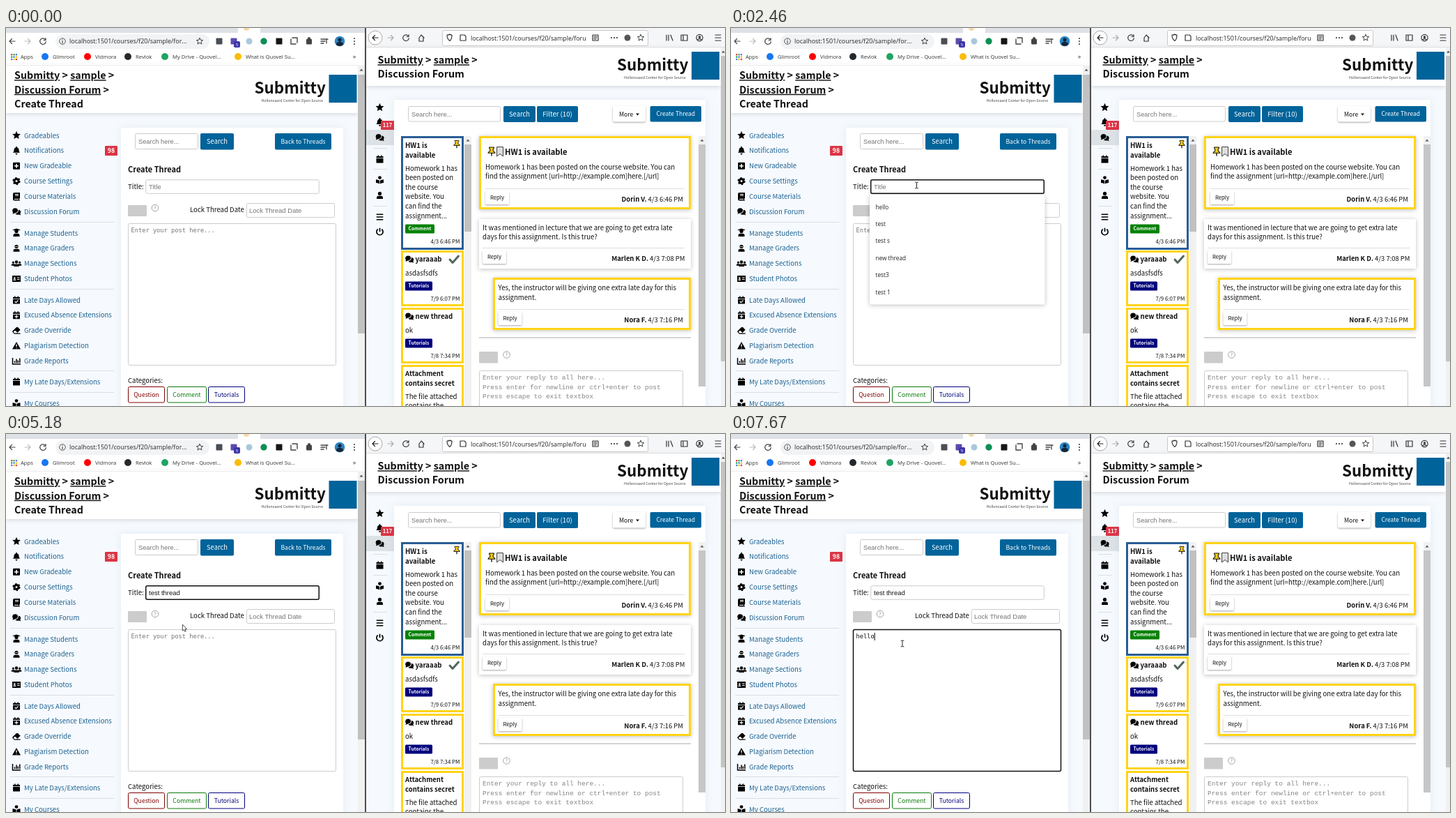
These frames come from a looping animation (1032 by 542 pixels, 8 s). An HTML page:

```html
<!DOCTYPE html>
<html lang="en">
<head>
<meta charset="utf-8">
<title>Create Thread</title>
<style>
html, body { margin: 0; width: 100%; height: 100%; overflow: hidden; background: #fff; }
svg { display: block; width: 1032px; height: 542px; }
text { font-family: "Noto Sans CJK SC", "Noto Sans CJK JP", "Noto Sans CJK KR", sans-serif; white-space: pre; }
.ui { font-family: "Open Sans", "Noto Sans", sans-serif; }
.option { font-family: "Open Sans", "Noto Sans", sans-serif; font-weight: 500; }
.field { font-family: "Liberation Sans", sans-serif; }
.mono { font-family: "DejaVu Sans Mono", monospace; }
.courier { font-family: "Liberation Mono", monospace; }
.b { font-weight: 700; }
.u { text-decoration: underline; }
.card { filter: drop-shadow(0 1px 3px rgba(0, 0, 0, .25)); }
.panel { filter: drop-shadow(0 0 6px rgba(60, 100, 140, .1)); }
.btn { filter: drop-shadow(0 1px 1px rgba(0, 0, 0, .35)); }
</style>
</head>
<body>
<svg id="stage" viewBox="0 0 1032 542" xmlns="http://www.w3.org/2000/svg"></svg>
<script>
const LOOP = 8000;
const INK = '#111', LINK = '#1d6190', BLUE = '#00639a', GOLD = '#ffd414', RED = '#dc3545', GREY = '#757575';
const PAGE = '#f6fafe';

// Drawing helpers; y of a text is the middle of its capitals.
const rect = (x, y, w, h, fill, more = '') =>
  `<rect x="${x}" y="${y}" width="${w}" height="${h}" fill="${fill}" ${more}/>`;
const box = (x, y, w, h, stroke, lw = 1, r = 2, fill = '#fff', more = '') =>
  rect(x + lw / 2, y + lw / 2, w - lw, h - lw, fill, `rx="${r}" stroke="${stroke}" stroke-width="${lw}" ${more}`);
const dot = (x, y, r, fill, more = '') => `<circle cx="${x}" cy="${y}" r="${r}" fill="${fill}" ${more}/>`;
const text = (s, x, y, size = 9.6, fill = INK, cls = '', anchor = 'start') =>
  `<text x="${x}" y="${y + size * .365}" font-size="${size}" fill="${fill}" class="${cls}" text-anchor="${anchor}">${s}</text>`;
const mid = (s, x, y, size, fill, cls) => text(s, x, y, size, fill, cls, 'middle');
const lines = (list, x, y, step, ...style) => list.map((s, i) => text(s, x, y + i * step, ...style)).join('');
const stroke = (d, color = '#444', lw = 1.2) =>
  `<path d="${d}" fill="none" stroke="${color}" stroke-width="${lw}" stroke-linecap="round" stroke-linejoin="round"/>`;
const fillPath = (d, color) => `<path d="${d}" fill="${color}"/>`;
const button = (s, x, y, w, h, size) =>
  rect(x, y, w, h, BLUE, 'rx="2"') + mid(s, x + w / 2, y + h / 2, size, '#fff');
const rule = (x1, x2, y, color = '#d9dfe4') => rect(x1, y, x2 - x1, 1, color);

const starPath = (r, inner) => 'M' + Array.from({ length: 10 }, (_, i) => {
  const a = Math.PI * i / 5, k = i % 2 ? inner : r;
  return `${(k * Math.sin(a)).toFixed(2)} ${(-k * Math.cos(a)).toFixed(2)}`;
}).join('L') + 'Z';

// Icons centred on 0,0 in a box of about 12 px.
const bubble = 'M-2-5C1-5 2-3.5 2-1.5S0 2-2 2L-5.5 3.5-5 1C-7-2-5-5-2-5Z';
const person = (x = 0, s = 1) =>
  `<g transform="translate(${x} 0) scale(${s})"><circle cy="-2.6" r="2.6"/><path d="M-4.5 5V3.5Q-4.5.8-1.8.8H1.8Q4.5.8 4.5 3.5V5Z"/></g>`;
const calendar = mark =>
  `<path d="M-5-4H-3V-5.5H-1.5V-4H1.5V-5.5H3V-4H5V-2H-5ZM-5-1.2H5V5.5H-5Z"/>${mark ? `<path d="${mark}" stroke="#fff" stroke-width="1.2" fill="none"/>` : ''}`;
const icons = {
  star: `<path d="${starPath(6.2, 2.9)}"/>`,
  bell: '<path d="M-5 3Q-3.5 1.5-3.5-1-3.5-4-.7-4.5V-6H.7V-4.5Q3.5-4 3.5-1 3.5 1.5 5 3ZM-1.6 4H1.6Q1 6 0 6T-1.6 4Z"/>',
  plus: '<rect x="-5" y="-5" width="10" height="10" rx="1"/><path d="M-3 0H3M0-3V3" stroke="#fff" stroke-width="1.6"/>',
  gear: '<circle r="3" fill="none" stroke="#000" stroke-width="3"/><circle r="4.7" fill="none" stroke="#000" stroke-width="1.8" stroke-dasharray="2.46"/>',
  book: '<path d="M-3-5.5H5V3H4V5H5V6H-3Q-5 6-5 4V-3.5Q-5-5.5-3-5.5Z"/><path d="M-2-3H3M-2-1.2H3M-3 4H3" stroke="#fff"/>',
  chat: `<path d="${bubble}"/><path d="M2.8-2.4C7-2 6.5 2 5.3 3L6.2 5.2 3.4 4.2C1.5 4.8-.8 4.2-1.6 2.9 1.5 2.8 3.2.5 2.8-2.4Z"/>`,
  grad: person() + '<path d="M-6-4.6L0-6.5 6-4.6 0-3Z"/>',
  grader: person() + '<path d="M-2-2.4H2" stroke="#fff" stroke-width=".7"/>',
  users: person(0, .85) + person(-4.6, .6) + person(4.6, .6),
  card: '<path d="M-6-4.5H6V4.5H-6Z"/><path d="M-4.5 2.5V1H-1V2.5ZM-4-2H-1.5V.2H-4ZM1-2H4.6V-1H1ZM1 .5H4.6V1.5H1Z" fill="#fff"/>',
  calCheck: calendar('M-2.4 2L-.6 3.6 2.6.4'),
  calPlus: calendar('M-2.5 2H2.5M0-.5V4.5'),
  cal: calendar(),
  eraser: '<path d="M-5.8 1L0-4.6H2L5.6-1 1 3.8H5.6V5H-3L-5.8 2Z"/><path d="M-2 0L1.6 3.2-.5 3.9H-2.6L-4.4 2Z" fill="#fff"/>',
  warn: '<path d="M0-5.5L6 5H-6Z"/><path d="M0-2V1.4M0 2.6V3.8" stroke="#fff" stroke-width="1.3"/>',
  chart: '<path d="M-5.5-4.5V4.5H6M-2.5 2.8V0M0 2.8V-3M2.3 2.8V-1M4.8 2.8V-4" fill="none" stroke="#000" stroke-width="1.5"/>',
  reader: '<circle cy="-3.4" r="2.4"/><path d="M-5.5-.8Q-2-.8-.4.8V5.5Q-2 4-5.5 4ZM5.5-.8Q2-.8.4.8V5.5Q2 4 5.5 4Z"/>',
  user: person(),
  bars: '<path d="M-4.8-3.8H4.8M-4.8 0H4.8M-4.8 3.8H4.8" stroke="#000" stroke-width="1.6"/>',
  power: '<path d="M-2.8-3.5A4.6 4.6 0 1 0 2.8-3.5M0-5.2V0" fill="none" stroke="#000" stroke-width="1.7"/>',
  pin: '<path d="M-3-5.5H3V-4L2-3V-.5Q4.5.5 4.5 2H-4.5Q-4.5.5-2-.5V-3L-3-4Z" fill="#ffcf10" stroke="#111"/><path d="M0 2V6" stroke="#111" stroke-width="1.3"/>'
};
const icon = (name, x, y, s = 1) => `<g transform="translate(${x} ${y}) scale(${s})">${icons[name]}</g>`;

const help = (x, y) => dot(x, y, 4.8, 'none', 'stroke="#999" stroke-width=".9"') + mid('?', x, y, 7, '#888');
const reload = (x, y) => stroke(`M${x + 3} ${y - 3}A4.3 4.3 0 1 0 ${x + 4.3} ${y + .6}M${x + 4} ${y - 4.5}V${y - 1.5}H${x + 1}`);
const arrow = (x, y, dir, color) => stroke(`M${x - 4} ${y}H${x + 4}M${x + dir * 4} ${y}l${-dir * 3.5}-3.5m0 7l${dir * 3.5}-3.5`, color);
const outlineStar = (x, y) =>
  `<path d="${starPath(5, 2.2)}" transform="translate(${x} ${y})" fill="none" stroke="#444"/>`;
const upArrow = (x, y) => fillPath(`M${x - 2.5} ${y + 1.5}L${x} ${y - 1.5}L${x + 2.5} ${y + 1.5}Z`, '#555');
const brand = (x, y) =>
  rect(x + 147, y + 5, 40, 40, BLUE) +
  text('Submitty', x + 40, y + 24, 22.4, INK, 'b') +
  text('Hollenvaard Center for Open Source', x + 50, y + 42, 5.3, '#444');
const header = (x, w, y, h) => rect(x, y, w, h, '#fff', 'style="filter:drop-shadow(0 1px 3px rgba(0,0,0,.16))"');
const crumb = s => `<tspan class="u">${s}</tspan> &gt;`;

function leftBrowser() {
  const bookmarks = [['Glimroot', 67, '#1877f2'], ['Vidmora', 128, '#f00'], ['Revlok', 186, '#24292e'],
    ['My Drive - Quovel...', 239, '#1fa463'], ['What is Quovel Su...', 344, '#fbbc04']];
  const extensions = [[306, '#4a4e55'], [327, '#5b4bb0'], [392, '#161616']];
  return rect(0, 0, 516, 542, PAGE) + rect(0, 0, 516, 53, '#fff') + rect(0, 0, 516, 7, '#dee1e6') +
    rect(333, 0, 32, 8, '#fff') + dot(345, 0, 4, '#f6d9a8') +
    arrow(9, 19, -1) + arrow(31, 19, 1, '#bbb') + reload(53, 19) +
    rect(71, 9, 221, 21, '#f1f3f4', 'rx="10.5"') +
    dot(81, 19, 4.3, 'none', 'stroke="#555"') + stroke('M81 18.8V21.3M81 16.8V17') +
    text('localhost:1501/courses/f20/sample/for...', 91, 19, 8.95, '#26282b', 'ui') + outlineStar(278, 19) +
    extensions.map(([x, c]) => rect(x - 4.5, 14.5, 9, 9, c, 'rx="1"')).join('') +
    rect(327, 19, 9, 9, '#3a36a8', 'rx="2"') + mid('5', 331.5, 23.5, 6, '#fff', 'ui') +
    dot(349, 19, 4.5, '#a9c8dc') + dot(370, 19, 4.7, '#0b8f55') +
    stroke('M409 16V23H416M411 14H418V21', '#444', 1.4) + rect(431, 15.5, 8, 8, '#444', 'rx="1.5"') + dot(435, 15, 2, '#444') +
    stroke('M452 16H460M452 19H458M452 22H456M460 22V16H462', '#444', 1.3) +
    dot(479, 19, 7.3, '#2a86c5') + dot(479, 16.8, 2.6, '#152638') + fillPath('M474 24Q474 19.8 479 19.8T484 24Q479 28 474 24Z', '#152638') +
    [15, 19, 23].map(y => dot(500, y, 1.1, '#444')).join('') +
    [0, 3.4, 6.8].map((a, i) => [0, 3.4, 6.8].map((b, j) =>
      rect(7 + a, 37 + b, 2.3, 2.3, ['#ea4335', '#34a853', '#4285f4', '#fbbc04'][(i + j) % 4])).join('')).join('') +
    text('Apps', 21, 41, 7.7, '#333', 'ui') +
    bookmarks.map(([s, x, c]) => dot(x - 11, 41, 5, c) + text(s, x, 41, 7.7, '#333', 'ui')).join('') +
    mid('»', 500, 40.5, 9, '#333', 'ui') + rect(0, 53, 505, 1, '#e2e4e6') +
    header(0, 505, 54, 68) + rect(0, 52, 505, 1.5, '#fff') +
    text(crumb('Submitty') + ' ' + crumb('sample'), 12, 68, 14.3, INK, 'b') +
    text(crumb('Discussion Forum'), 12, 88.5, 14.3, INK, 'b') + text('Create Thread', 12, 109, 14.3, INK, 'b') +
    brand(316.5, 62) + leftMenu() + leftForm() +
    rect(505, 54, 10, 488, '#f1f1f1') + rect(505, 67, 10, 371, '#c1c1c1') + upArrow(510, 60);
}

function leftMenu() {
  const groups = [
    [154, ['star', 'Gradeables'], ['bell', 'Notifications'], ['plus', 'New Gradeable'], ['gear', 'Course Settings'],
      ['book', 'Course Materials'], ['chat', 'Discussion Forum']],
    [294, ['grad', 'Manage Students'], ['grader', 'Manage Graders'], ['users', 'Manage Sections'], ['card', 'Student Photos']],
    [390, ['calCheck', 'Late Days Allowed'], ['calPlus', 'Excused Absence Extensions'], ['eraser', 'Grade Override'],
      ['warn', 'Plagiarism Detection'], ['chart', 'Grade Reports']],
    [507, ['cal', 'My Late Days/Extensions']],
    [538, ['reader', 'My Courses']]
  ];
  return groups.map(([y, ...items]) =>
    items.map(([name, s], i) => icon(name, 15, y + i * 21.85) + text(s, 26, y + i * 21.85, 9.6, LINK)).join('')).join('') +
    [278, 374, 491, 522].map(y => rule(6, 155, y)).join('') +
    rect(142, 169, 18, 14, RED, 'rx="1"') + mid('98', 151, 176, 8.7, '#fff', 'b');
}

function leftForm() {
  const category = (s, x, w, c) => box(x, 514, w, 23.5, c) + mid(s, x + w / 2, 525.5, 8.7, c);
  return rect(165, 143, 319, 410, '#fff', 'class="panel"') +
    box(185, 151, 91, 23, '#ccc') + text('Search here...', 190, 162.5, 9.3, GREY, 'field') +
    button('Search', 279, 151, 48, 23.5, 9.4) + button('Back to Threads', 386, 151, 81, 23.5, 8.6) +
    text('Create Thread', 175, 203, 11, INK, 'b') + text('Title:', 175, 227) +
    rect(175, 254, 27, 16, '#ccc', 'rx="1"') + help(214, 258) +
    text('Lock Thread Date', 264, 260.5) + box(345, 251, 127, 21, '#ccc') +
    text('Lock Thread Date', 349, 261.5, 9.5, GREY, 'field') +
    text('Categories:', 175, 505) +
    category('Question', 175, 53, '#800000') + category('Comment', 231, 57, '#0a7a0a') + category('Tutorials', 290, 53, '#00007c');
}

function rightBrowser() {
  const lineIcons = 'M593 14L596 10 600 14M593 14V19H599V14M652 10H658L660 12V18H652ZM842 10H850V18H842ZM844 12H848M844 14H848M844 16H847' +
    'M633 10Q636 10 637 9 638 10 640 10 640 16 637 18.5 633 16 633 10M948 10V18M951 10V18M954 10L957 18M969 10H978V18H969ZM972 10V18M1018 10H1026M1018 14H1026M1018 18H1026';
  return rect(516, 0, 516, 542, PAGE) + rect(516, 0, 516, 28, '#f5f6f7') +
    box(626, 3, 296, 23, '#c8c8cc') + dot(530, 14, 10, '#fff', 'stroke="#aaa"') + arrow(530, 14, -1, '#222') +
    arrow(552, 14, 1, '#aaa') + reload(574, 14) + stroke(lineIcons, '#333') +
    '<clipPath id="url"><rect x="660" y="3" width="173" height="22"/></clipPath><g clip-path="url(#url)">' +
    text('localhost:1501/courses/f20/sample/forum', 667, 14.5, 8.9, '#222', 'ui') + '</g>' +
    [869, 873, 877].map(x => dot(x, 14, 1.1, '#333')).join('') + dot(892, 14, 4.5, '#555') + outlineStar(911, 14) +
    dot(995.5, 14, 4.6, 'none', 'stroke="#333" stroke-width="1.2"') + dot(995.5, 13, 1.8, '#333') + stroke('M992.5 17Q995.5 14 998.5 17', '#333') +
    rect(516, 27, 516, 1, '#ccc') + header(517, 509, 28, 55) + rect(516, 26, 516, 1.5, '#f5f6f7') +
    text(crumb('Submitty') + ' ' + crumb('sample'), 533.5, 46, 14.3, INK, 'b') + text('Discussion Forum', 533.5, 66, 14.3, INK, 'b') +
    brand(837, 29) + rightMenu() +
    rect(557, 103, 447, 450, '#fff', 'class="panel"') + rightTools() + threads() + posts() +
    rect(994, 155, 10, 359, '#f1f1f1') + rect(994, 167, 10, 347, '#c6c6c6') + upArrow(999, 161) +
    rect(1026, 28, 6, 514, '#f1f1f1') + rect(1026, 40, 6, 438, '#c4c4c4') + upArrow(1029.5, 34) +
    rect(515, 0, 2, 542, '#4b4d50');
}

function rightMenu() {
  const items = [['star', 114], ['bell', 135], ['chat', 157], ['cal', 188], ['reader', 218], ['user', 240], ['bars', 271], ['power', 292]];
  return rect(517, 146, 40, 22, '#dde2e6') + items.map(([name, y]) => icon(name, 536.5, y)).join('') +
    [172, 202, 255].map(y => rule(527, 547, y)).join('') +
    rect(538, 133, 19, 13, RED, 'rx="1"') + mid('117', 547.5, 139.5, 7.6, '#fff', 'b');
}

function rightTools() {
  return box(577, 112, 133, 22.5, '#ccc') + text('Search here...', 582, 123.5, 9.3, GREY, 'field') +
    button('Search', 714, 112, 46, 23, 9.4) + button('Filter (10)', 762, 112, 59, 23, 9.6) +
    rect(871, 112, 47, 22.5, '#fff', 'rx="2" class="btn"') + text('More', 880, 123.5, 8.7) + fillPath('M904 122.5H909L906.5 125.5Z', INK) +
    button('Create Thread', 924.5, 112, 73.5, 22.5, 8.5);
}

function threads() {
  const x = 573;
  const tag = (s, y, w, c) => rect(x, y - 6.5, w, 13, c, 'rx="1.5"') + mid(s, x + w / 2, y, 6.8, '#fff', 'b');
  const stamp = (s, y) => text(s, 651.5, y, 7.9, INK, '', 'end');
  const small = (title, body, date, y) => box(567, y, 90, 80, GOLD, 3, 0) + icon('chat', 579, y + 12.5) +
    text(title, 587.5, y + 12.5, 9.6, INK, 'b') + text(body, x, y + 32) + tag('Tutorials', y + 51, 39, '#00007c') + stamp(date, y + 69);
  return box(567, 155, 90, 163, '#2a5d95', 3, 0) + lines(['HW1 is', 'available'], x, 168.5, 13.5, 9.7, INK, 'b') +
    icon('pin', 647, 166.5, .95) +
    lines(['Homework 1 has', 'been posted on', 'the course', 'website. You', 'can find the', 'assignment...'], x, 201, 13.6) +
    tag('Comment', 288, 42, '#078207') + stamp('4/3 6:46 PM', 306) +
    small('yaraaab', 'asdasfsdfs', '7/9 6:07 PM', 319) + stroke('M637 332L641 336.5 649.5 327', '#52685a', 3) +
    small('new thread', 'ok', '7/8 7:34 PM', 401) +
    box(567, 483, 90, 70, GOLD, 3, 0) + lines(['Attachment', 'contains secret'], x, 496, 13.5, 9.5, INK, 'b') +
    lines(['The file attached', 'contains the'], x, 528, 13.5) +
    rect(658, 155, 10, 387, '#f1f1f1') + rect(658, 167, 10, 125, '#c1c1c1') + upArrow(663, 161);
}

function posts() {
  const post = ({ x, y, h, textY, pad, right = 972, framed, body, who, when }) => {
    const end = y + h;
    return `<g class="card">${framed ? box(x, y, 983 - x, h, GOLD, 3, 0) : rect(x, y, 983 - x, h, '#fff')}</g>` +
      rule(pad, 974, end - 30, '#ddd') +
      rect(pad, end - 26, 34, 19, '#fff', 'rx="1.5" class="btn"') + mid('Reply', pad + 17, end - 16.5, 7.7, INK) +
      text(`<tspan class="b">${who}</tspan> ${when}`, right, end - 14.5, 9.45, INK, '', 'end') +
      lines(body, pad, textY, 13.7, 9.65);
  };
  return post({ x: 679, y: 155, h: 105, textY: 199, pad: 688, framed: true, who: 'Dorin V.', when: '4/3 6:46 PM',
      body: ['Homework 1 has been posted on the course website. You can', 'find the assignment [url=http://example.com]here.[/url]'] }) +
    icon('pin', 697, 177, 1.1) + '<path d="M704.5 170.5H713.5V184L709 180.5 704.5 184Z" fill="#ddd" stroke="#444"/>' +
    text('HW1 is available', 716, 177.5, 11.2, INK, 'b') +
    post({ x: 679, y: 274, h: 71, textY: 286, pad: 684, right: 974.5, who: 'Marlen K D.', when: '4/3 7:08 PM',
      body: ['It was mentioned in lecture that we are going to get extra late', 'days for this assignment. Is this true?'] }) +
    post({ x: 699, y: 358, h: 75, textY: 372.5, pad: 706.5, framed: true, who: 'Nora F.', when: '4/3 7:16 PM',
      body: ['Yes, the instructor will be giving one extra late day for this', 'assignment.'] }) +
    rule(679, 983, 443.5, '#aaa') + rect(679, 464, 27, 16.5, '#ccc', 'rx="1"') + help(718.5, 468.5) +
    box(679, 491, 293, 70, '#ccc') +
    lines(['Enter your reply to all here...', 'Press enter for newline or ctrl+enter to post', 'Press escape to exit textbox'],
      684, 501, 13.5, 9.47, '#858585', 'courier');
}

const stage = document.getElementById('stage');
stage.innerHTML = leftBrowser() + rightBrowser() + `
  <rect id="titleBox" x="200.75" y="217.75" width="248.5" height="19.5" rx="2" fill="#fff"/>
  <rect id="bodyBox" x="175.5" y="280.5" width="298" height="203" rx="2" fill="#fff"/>
  <text id="titleText" class="field" x="205" y="230.5" font-size="9.5"/>
  <text id="bodyText" class="mono" x="179.5" y="293.3" font-size="8.7"/>
  <g id="menu"></g>
  <rect id="caret" width="1" fill="#000"/>
  <g id="cursor">
    <path id="pointer" d="M0 0V9L2.1 7.2 3.5 10.2 4.9 9.6 3.6 6.6H6.3Z" fill="#fff" stroke="#222" stroke-width=".8"/>
    <path id="beam" d="M-2.3-4.3H-.6L0-3.8.6-4.3H2.3M0-3.8V3.8M-2.3 4.3H-.6L0 3.8.6 4.3H2.3" fill="none" stroke="#222"/>
  </g>
  <circle id="glow" r="8" fill="#f6ec20" opacity=".6"/>`;
const el = id => document.getElementById(id);
const show = (id, on) => el(id).setAttribute('visibility', on ? 'visible' : 'hidden');
const set = (id, attrs) => { for (const k in attrs) el(id).setAttribute(k, attrs[k]); };
const within = (t, spans) => spans.some(([a, b]) => t >= a && t < b);
const latest = (list, t) => list.filter(([at]) => t >= at).pop()?.[1];

const titleKeys = [[0, ''], [2770, 'te'], [2920, 'tes'], [3080, 'test'], [3780, 'test '], [3930, 'test t'],
  [4100, 'test th'], [4175, 'test thr'], [4250, 'test threa'], [4480, 'test thread']];
const bodyKeys = [[0, ''], [7130, 'h'], [7280, 'he'], [7430, 'hel'], [7520, 'hell'], [7670, 'hello']];
const menus = [[2010, ['hello', 'test', 'test s', 'new thread', 'test3', 'test 1']],
  [2770, ['test', 'test s', 'test3', 'test thread', 'test 1', 'test 2']],
  [2920, ['test', 'test s', 'test3', 'test 1', 'test 2', 'test branch']],
  [3780, ['test s', 'test 1', 'test 2', 'test branch', 'test thread', 'test a']],
  [3930, ['test thread']], [4480, null]];
const caretOn = [[1910, 2460], [2770, 3630], [3780, 5030], [5570, 6270], [6730, LOOP]];
const smooth = p => p * p * (3 - 2 * p), easeOut = p => 1 - (1 - p) ** 2.5, linear = p => p;
const moves = [
  { start: 130, end: 280, steps: 3, from: [778, 531], to: [493, 394], ease: linear },
  { start: 580, end: 1120, steps: 8, from: [478, 386], to: [264, 219], ease: smooth },
  { start: 1520, end: 1680, steps: 3, from: [264.5, 221], to: [266.5, 225.5], ease: linear },
  { start: 5030, end: 5570, steps: 8, from: [263, 237], to: [246, 300.5], ease: easeOut }
];

function cursorAt(t) {
  const m = moves.filter(m => t >= m.start).pop();
  if (!m) return null;
  const last = m.steps - 1;
  const k = Math.min(last, Math.floor((t - m.start + 8) / (m.end - m.start) * last));
  const p = m.ease(k / last);
  return m.from.map((v, i) => v + (m.to[i] - v) * p);
}

let shownMenu;
function drawMenu(items) {
  if (items === shownMenu) return;
  shownMenu = items;
  el('menu').innerHTML = items ? rect(199, 239, 251.5, 11 + items.length * 24.4, '#fff', 'rx="2" class="card"') +
    lines(items, 207.5, 256.5, 24.4, 8.25, '#222', 'option') : '';
}

function draw(t) {
  const inBody = t >= 5720, inTitle = t >= 1910 && !inBody;
  const title = latest(titleKeys, t), body = latest(bodyKeys, t);
  const outline = on => ({ stroke: on ? '#111' : '#ccc', 'stroke-width': on ? 1.5 : 1 });
  set('titleBox', outline(inTitle));
  set('bodyBox', outline(inBody));
  el('titleText').textContent = title || 'Title';
  set('titleText', { fill: title ? '#111' : GREY });
  el('bodyText').textContent = body || 'Enter your post here...';
  set('bodyText', { fill: body ? '#111' : GREY });
  drawMenu(latest(menus, t));

  const typed = inBody ? body : title, field = inBody ? 'bodyText' : 'titleText';
  const width = typed ? el(field).getComputedTextLength() : 0;
  set('caret', { x: (inBody ? 179.5 : 204.7) + width, y: inBody ? 285 : 222, height: 11 });
  show('caret', within(t, caretOn));

  const at = cursorAt(t);
  show('glow', within(t, [[1910, 2150], [5720, 5870]]));
  show('pointer', false);
  show('beam', false);
  if (!at) return;
  const [x, y] = at;
  const overField = (x > 200 && x < 450 && y > 217 && y < 238) || (x > 175 && x < 474 && y > 280 && y < 484);
  show(overField ? 'beam' : 'pointer', true);
  set('cursor', { transform: `translate(${x} ${y})` });
  set('glow', { cx: x - .5, cy: y });
}

function tick() {
  draw(performance.now() % LOOP);
  requestAnimationFrame(tick);
}
tick();
</script>
</body>
</html>
```
